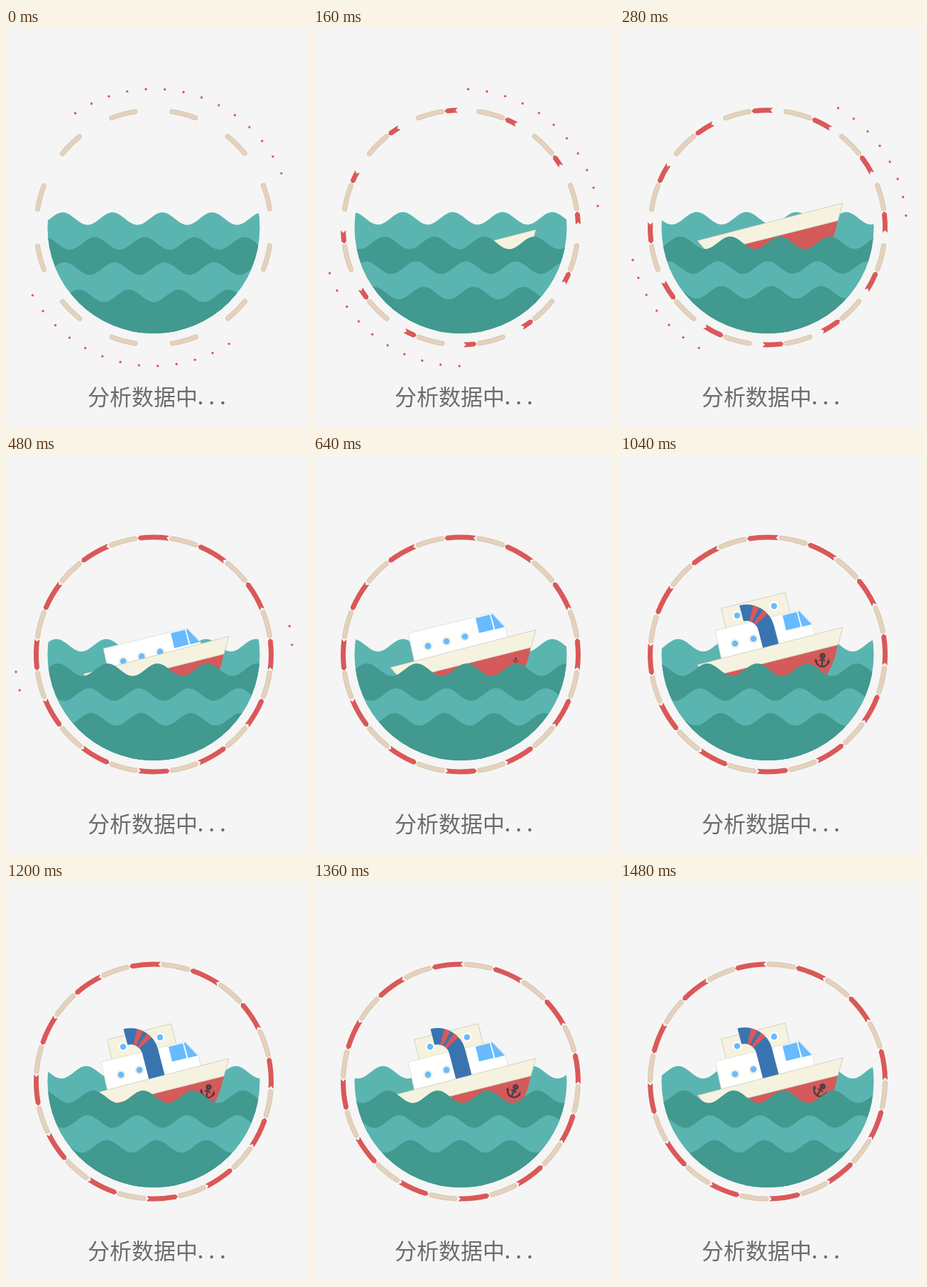
Recreate the animation shown at these times as an HTML page with a canvas. Size 424 px wide and 563 px high, loop 1520 ms.

```html
<!DOCTYPE html>
<html lang="zh">
<head>
<meta charset="utf-8">
<style>
html, body { margin: 0; width: 100%; height: 100%; overflow: hidden; background: #f5f5f5; }
canvas { display: block; }
</style>
</head>
<body>
<canvas id="stage" width="424" height="563"></canvas>
<script>
const ctx = document.getElementById('stage').getContext('2d');
const LOOP = 1520, STEP = 40, CX = 208, CY = 281.5, DEG = Math.PI / 180;
const BG = '#f5f5f5', RED = '#db5858', CREAM = '#f5f2df', BLUE = '#3a74b0', SKY = '#68bbff';
const LIGHT = '#5ab5b1', DARK = '#41998f';
const TILT = -14.5 * DEG;

const KEYS = [0, 280, 480, 800, 1040, 1200, 1480];
const BOB = [350, 247, 256, 237, 243, 249, 248];
const SWING = [0, 0, 0, 0, 5, 14, 32];
const WAVES = [
  { y: 268.5, drop: 0.5, color: LIGHT, crest: [150, 108, 71, 52, 82, 113, 82] },
  { y: 303, drop: 1, color: DARK, crest: [125, 85, 73, 86, 123, 123, 90] },
  { y: 338, drop: 1.5, color: LIGHT, crest: [153, 138, 117, 120, 113, 115, 127] },
  { y: 373, drop: 5, color: DARK, crest: [173, 143, 120, 117, 142, 142, 133] }
];

const clamp = x => Math.max(0, Math.min(1, x));

function smooth(t, from, to) {
  const p = clamp((t - from) / (to - from));
  return p * p * (3 - 2 * p);
}

// Cubic curve through the values at KEYS
function track(values, t) {
  const last = KEYS.length - 1;
  let i = 0;
  while (i < last - 1 && t >= KEYS[i + 1]) i++;
  const slope = k => {
    const a = Math.max(0, k - 1), b = Math.min(last, k + 1);
    return (values[b] - values[a]) / (KEYS[b] - KEYS[a]);
  };
  const span = KEYS[i + 1] - KEYS[i], p = (t - KEYS[i]) / span, q = 1 - p;
  return values[i] * q * q * (1 + 2 * p) + values[i + 1] * p * p * (3 - 2 * p)
    + span * p * q * (slope(i) * q - slope(i + 1) * p);
}

// Angles run clockwise from the top of the ring
const polar = (deg, r) => [CX + r * Math.sin(deg * DEG), CY - r * Math.cos(deg * DEG)];

function circle(x, y, r, color) {
  ctx.beginPath();
  ctx.arc(x, y, r, 0, 2 * Math.PI);
  ctx.fillStyle = color;
  ctx.fill();
}

function polygon(color, points, edge) {
  ctx.beginPath();
  points.forEach(p => ctx.lineTo(...p));
  ctx.closePath();
  ctx.fillStyle = color;
  ctx.fill();
  if (edge) stroke(edge, 0.6);
}

function stroke(color, width) {
  ctx.strokeStyle = color;
  ctx.lineWidth = width;
  ctx.stroke();
}

function dots(head, tail, t) {
  if (t >= 580) return;
  const count = Math.max(1, Math.floor((head - tail) / 7.8) + 1);
  for (let i = 0; i < count; i++) circle(...polar(head - i * 7.8, 195.5), 1.7, RED);
}

function ring(t) {
  const turn = -0.98e-5 * Math.max(0, t - 560) ** 2;
  const grow = clamp(t / 430);
  for (let k = 0; k < 12; k++) {
    const mid = turn + k * 30;
    ctx.beginPath();
    ctx.arc(CX, CY, 165.5, (mid - 81) * DEG, (mid - 69.2) * DEG);
    ctx.lineCap = 'round';
    stroke('#d8c2a8', 7);
    stroke('#e3d2bd', 5.4);
  }
  ctx.lineCap = 'butt';
  if (!grow) return;
  for (let k = 0; k < 12; k++) {
    const a = turn + k * 30 - 6.7, b = a + 14.2 * grow;
    ctx.beginPath();
    ctx.arc(CX, CY, 169, (a - 90) * DEG, (b - 90) * DEG);
    ctx.lineTo(...polar(b - 1.2, 165.5));
    ctx.arc(CX, CY, 162, (b - 90) * DEG, (a - 90) * DEG, true);
    ctx.lineTo(...polar(a - 1.2, 165.5));
    ctx.closePath();
    stroke(BG, 2);
    ctx.fillStyle = RED;
    ctx.fill();
  }
}

function wave({ y, drop, color, crest }, t) {
  const peak = track(crest, t), mid = y + drop * clamp(1 - t / 200);
  ctx.save();
  ctx.beginPath();
  ctx.arc(CX, CY, 149.5, 0, 2 * Math.PI);
  ctx.clip();
  ctx.beginPath();
  ctx.moveTo(50, 440);
  for (let x = 50; x <= 366; x += 2) {
    ctx.lineTo(x, mid - 8.8 * Math.cos((x - peak) / 70.2 * 2 * Math.PI));
  }
  ctx.lineTo(366, 440);
  ctx.fillStyle = color;
  ctx.fill();
  ctx.restore();
}

// Draws a part pushed down into the hull along the tilted axis
function sunk(depth, draw) {
  ctx.save();
  ctx.translate(0.25 * depth, 0.97 * depth);
  draw();
  ctx.restore();
}

function portholes(x, y, rim) {
  for (let i = 0; i < 3; i++) {
    circle(x + 26 * i, y - 6.7 * i, 6.6, rim);
    circle(x + 26 * i, y - 6.7 * i, 4.3, SKY);
  }
}

function deck() {
  polygon(CREAM, [[142.5, 210.5], [232.5, 188], [240, 218], [150, 241]], '#bdb9a8');
  portholes(165, 220.5, '#fff');
}

function cabin() {
  polygon('#fff', [[134, 242], [252, 213], [271, 233], [276, 255], [270, 262], [144, 288]], '#d2d0c8');
  polygon(SKY, [[229, 220.5], [249, 215.5], [254.5, 236.5], [234, 241.5]]);
  polygon(SKY, [[250.5, 215], [252.5, 214.5], [270, 233], [256.5, 236.3]]);
  portholes(162, 260, '#f1efe2');
}

function funnel() {
  const bend = (from, to, color) => {
    ctx.beginPath();
    ctx.arc(0, 0, 28.5, (from - 90) * DEG, (to - 90) * DEG);
    stroke(color, 23);
  };
  ctx.translate(175.5, 234.3);
  ctx.rotate(TILT);
  bend(0, 90, BLUE);
  ctx.fillStyle = BLUE;
  ctx.fillRect(17, -0.5, 23, 50);
  bend(28, 41, RED);
  bend(50, 62, RED);
}

function hull() {
  polygon('#d55a5a', [[122, 306], [307, 261], [303, 278], [297, 294], [287, 312], [270, 340], [145, 340]]);
  polygon(CREAM, [[109, 290], [314, 237], [307, 262], [124, 308]], '#bdb9a8');
}

function anchor(t) {
  const size = smooth(t, 560, 760);
  if (!size) return;
  const ink = '#4a4046';
  ctx.save();
  ctx.translate(285.5, 277.5);
  ctx.rotate(track(SWING, t) * DEG);
  ctx.scale(size, size);
  circle(0, 0, 4.2, ink);
  circle(0, 0, 1, '#a04d50');
  ctx.beginPath();
  ctx.moveTo(0, 2);
  ctx.lineTo(0, 15);
  ctx.moveTo(-4, 6);
  ctx.lineTo(4, 6);
  ctx.moveTo(9, 7);
  ctx.arc(0, 6, 9, 0.1, Math.PI - 0.1);
  stroke(ink, 2.4);
  for (const side of [-1, 1]) polygon(ink, [[side * 9.5, 4], [side * 6, 9], [side * 11, 9.5]]);
  ctx.restore();
}

function boat(t) {
  ctx.save();
  ctx.beginPath();
  ctx.rect(0, 0, 424, 318);
  ctx.clip();
  ctx.translate(0, track(BOB, t) - 237);
  if (t > 500) sunk(42 * (1 - smooth(t, 520, 860)), deck);
  if (t > 280) sunk(48 * (1 - smooth(t, 280, 580)), cabin);
  if (t > 680) sunk(80 * (1 - smooth(t, 680, 1150)), funnel);
  hull();
  anchor(t);
  ctx.restore();
}

function caption() {
  ctx.fillStyle = '#6c6c6c';
  ctx.font = '31px "Noto Sans CJK SC", "Noto Sans CJK", sans-serif';
  ctx.fillText('分析数据中', 115, 532);
  for (let i = 0; i < 3; i++) circle(274 + 15.7 * i, 529, 2.2, '#6c6c6c');
}

function draw(now) {
  const t = Math.floor(now % LOOP / STEP) * STEP;
  ctx.fillStyle = BG;
  ctx.fillRect(0, 0, 424, 563);
  dots(86 - 19 * clamp(1 - t / 440) ** 3, -40 + 0.23 * t, t);
  dots(265 - 24.3 * (1 - t / 686) ** 2, 143 + 0.225 * t, t);
  ring(t);
  wave(WAVES[0], t);
  boat(t);
  WAVES.slice(1).forEach(w => wave(w, t));
  caption();
  requestAnimationFrame(draw);
}
requestAnimationFrame(draw);
</script>
</body>
</html>
```
